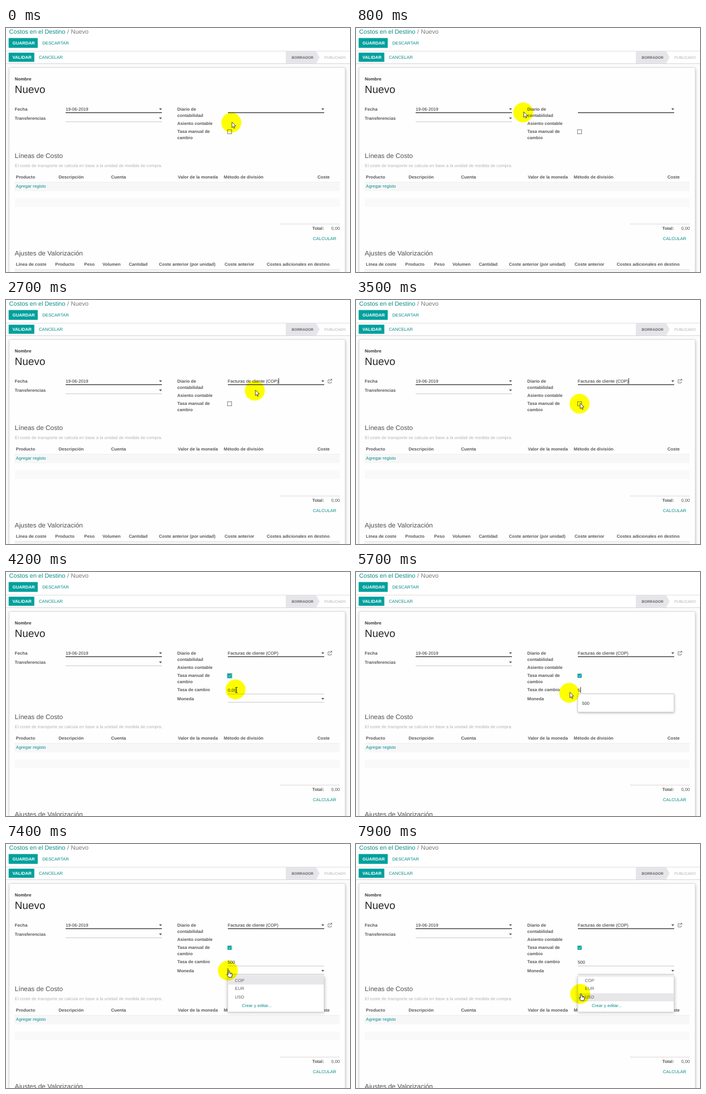
These frames come from a looping animation (600x428 px, 8 s). An HTML page with a canvas:

```html
<!DOCTYPE html>
<html lang="es">
<head>
<meta charset="utf-8">
<title>Costos en el Destino</title>
<style>
html, body { margin: 0; width: 600px; height: 428px; overflow: hidden; background: #fff; }
canvas { display: block; width: 600px; height: 428px; }
</style>
</head>
<body>
<canvas id="stage" width="600" height="428"></canvas>
<script>
const ctx = document.getElementById('stage').getContext('2d');
const LOOP = 8000, STEP = 100;
const FONT = '"Liberation Sans", Arial, sans-serif';
const TEAL = '#00a09d', LINK = '#078c89', INK = '#505050', DARK = '#2c2c2c';

// Pointer path: time, x, y
const path = [
  [0, 393, 166], [400, 205, 152], [500, 205, 152], [1200, 425, 142],
  [1900, 425, 142], [2500, 434, 159], [2700, 434, 159], [3500, 390, 182],
  [3600, 390, 182], [4100, 400, 206], [4500, 402, 206], [4800, 372, 212],
  [6600, 372, 212], [7300, 387, 222], [7500, 387, 222], [7900, 391, 263]
];

const journals = ['Facturas de cliente', 'Facturas de proveedor', 'Operaciones varias',
  'Diario de stock', 'Diferencia de cambio', 'Banco', 'Efectivo'].map(s => s + ' (COP)');
const journalMenu = { y: 153, items: journals, links: ['Buscar más...', 'Crear y editar...'] };
const currencyMenu = { y: 232.5, items: ['COP', 'EUR', 'USD'], links: ['Crear y editar...'] };
const ROW = 14.65;

function pointerAt(t) {
  const i = path.findIndex(p => p[0] >= t);
  if (i <= 0) return { x: path[0][1], y: path[0][2] };
  const [t0, x0, y0] = path[i - 1], [t1, x1, y1] = path[i];
  const u = (t - t0) / (t1 - t0), e = u * u * (3 - 2 * u);
  return { x: x0 + (x1 - x0) * e, y: y0 + (y1 - y0) * e };
}

function text(s, x, y, color = INK, size = 7.65, bold = false) {
  ctx.font = (bold ? 'bold ' : '') + size + 'px ' + FONT;
  ctx.textRendering = 'geometricPrecision';
  ctx.fillStyle = color;
  ctx.fillText(s, x + 0.3, y - 0.2);
}
const label = (s, x, y) => text(s, x, y, '#5a5a5a', 7.65, true);

function rect(x, y, w, h, color) {
  ctx.fillStyle = color;
  ctx.fillRect(x, y, w, h);
}

function poly(points, fill, stroke, width = 1) {
  ctx.beginPath();
  points.forEach(([x, y]) => ctx.lineTo(x, y));
  if (fill) { ctx.closePath(); ctx.fillStyle = fill; ctx.fill(); }
  if (stroke) { ctx.strokeStyle = stroke; ctx.lineWidth = width; ctx.stroke(); }
}

function panel(x, y, w, h, blur, fill = '#fff') {
  ctx.save();
  ctx.shadowColor = 'rgba(0,0,0,.33)';
  ctx.shadowBlur = blur;
  ctx.shadowOffsetY = 1;
  rect(x, y, w, h, fill);
  ctx.restore();
  ctx.strokeStyle = '#d6d6d8';
  ctx.lineWidth = 0.7;
  ctx.strokeRect(x, y, w, h);
}

function field(x, y, required, arrow = true) {
  if (required) rect(x, y - 0.2, 168, 1.4, '#3c3c3c');
  else rect(x, y, 168, 1, '#c9c9c9');
  if (arrow) poly([[x + 163, y - 7], [x + 168, y - 7], [x + 165.5, y - 4]], '#555');
}

const caret = (x, y) => rect(x, y - 5, 1, 10, '#333');

function header() {
  rect(0, 0, 600, 428, '#fbfbfb');
  rect(0, 0, 600, 62, '#fff');
  rect(0, 40, 600, 1, '#dedede');
  rect(0, 62, 600, 1, '#d6d6d6');
  text('Costos en el Destino', 5.3, 10, LINK, 10.6);
  text('/', 106.5, 10, '#777', 10.6);
  text('Nuevo', 113, 10, '#777', 10.6);
  rect(4.6, 17.6, 50.8, 17.2, TEAL);
  text('GUARDAR', 11, 29.5, '#fff', 7.6, true);
  text('DESCARTAR', 63, 29.5, LINK);
  rect(4.6, 43.3, 44.8, 16, TEAL);
  text('VALIDAR', 11, 54, '#fff', 7.6, true);
  text('CANCELAR', 57, 54, LINK);
  poly([[488, 41], [541, 41], [547, 51.5], [541, 62], [488, 62]], '#e6e6ea');
  text('BORRADOR', 498, 54, '#666', 6.45, true);
  text('PUBLICADO', 555, 54, '#aaa', 6.45);
}

function linkIcon() {
  poly([[565, 139.8], [561.8, 139.8], [561.8, 145.6], [567.2, 145.6], [567.2, 143]], null, '#777', 0.9);
  poly([[564, 143], [568, 139]], null, '#777', 1);
  poly([[565.4, 138.4], [568.8, 138.4], [568.8, 141.8]], '#777');
}

function checkbox(on, focus) {
  if (!on) {
    ctx.strokeStyle = '#777';
    ctx.lineWidth = 0.9;
    ctx.strokeRect(386.4, 178.4, 7.2, 7.2);
    return;
  }
  if (focus) rect(385.3, 177.3, 9.4, 9.4, '#8fc9c8');
  rect(386.4, 178.4, 7.2, 7.2, TEAL);
  poly([[388.2, 182.2], [389.5, 183.5], [392, 180.8]], null, '#fff', 1);
}

function form(s) {
  panel(5.5, 69.5, 586, 380, 5, '#fefefe');
  text('Nombre', 15, 92, '#333', 7.65, true);
  text('Nuevo', 15, 114.5, '#222', 18.4);
  label('Fecha', 15, 145);
  text('19-06-2019', 104, 145, DARK);
  field(104, 148, true);
  label('Transferencias', 15, 161);
  field(104, 164, false);
  label('Diario de', 298.5, 145);
  label('contabilidad', 298.5, 156);
  field(387, 148, true);
  label('Asiento contable', 298.5, 170);
  label('Tasa manual de', 298.5, 184.5);
  label('cambio', 298.5, 195);
  checkbox(s.checked, s.focusCheck);
  if (s.journal) {
    text(journals[0], 386.5, 145, DARK);
    linkIcon();
  }
  if (s.checked) {
    label('Tasa de cambio', 298.5, 209.5);
    field(387, 213.5, false, false);
    label('Moneda', 298.5, 225.5);
    field(387, 228, false);
    if (s.selected) rect(386.5, 202, 15.5, 10, '#3390ff');
    text(s.rate, 386.5, 210, s.selected ? '#fff' : DARK);
  }
}

function lines(dy) {
  ctx.save();
  ctx.translate(0, dy);
  text('Líneas de Costo', 15, 228, '#505050', 11.5);
  text('El coste de transporte se calcula en base a la unidad de medida de compra.', 15, 244, '#b4b4b4');
  const cols = [['Producto', 17], ['Descripción', 91.5], ['Cuenta', 183], ['Valor de la moneda', 299.5],
    ['Método de división', 379.5], ['Coste', 543]];
  cols.forEach(([s, x]) => label(s, x, 264.5));
  rect(15, 270, 567, 16, '#f7f7f8');
  rect(15, 270, 567, 1, '#eeeeee');
  rect(15, 299, 567, 15, '#f9f9fa');
  text('Agregar registo', 17, 280, LINK);
  rect(478, 343.5, 104, 0.8, '#ccc');
  label('Total:', 534, 354.5);
  text('0,00', 567, 354.5);
  text('CALCULAR', 535, 372.5, LINK);
  text('Ajustes de Valorización', 15, 399, '#505050', 11.5);
  const adjust = [['Línea de coste', 17], ['Producto', 85.5], ['Peso', 136], ['Volumen', 168], ['Cantidad', 214],
    ['Coste anterior (por unidad)', 266.5], ['Coste anterior', 381], ['Costes adicionales en destino', 454.5]];
  adjust.forEach(([s, x]) => label(s, x, 417.5));
  rect(15, 423, 567, 16, '#f3f3f3');
  rect(15, 423, 567, 1, '#e6e6e6');
  ctx.restore();
}

function menu(m, active) {
  const rows = m.items.length + m.links.length;
  panel(387, m.y - 0.7, 167.5, rows * ROW + 4, 6);
  rect(387.5, m.y + active * ROW, 166.5, 14, '#e7e7ea');
  m.items.forEach((s, i) => text(s, 399, m.y + 9.3 + i * ROW, '#606060'));
  m.links.forEach((s, i) => text(s, 411, m.y + 9.3 + (m.items.length + i) * ROW, LINK));
}

function arrow(x, y) {
  poly([[0, 0], [0, 9.6], [2.2, 7.6], [3.7, 11], [5.2, 10.3], [3.8, 7], [6.8, 6.8]]
    .map(([a, b]) => [x + a, y + b]), '#fff', '#222', 0.8);
}

function hand(x, y) {
  ctx.beginPath();
  ctx.moveTo(x - 1, y + 0.8);
  ctx.quadraticCurveTo(x, y - 0.8, x + 1, y + 0.8);
  ctx.lineTo(x + 1, y + 4.5);
  ctx.lineTo(x + 5.2, y + 5.4);
  ctx.quadraticCurveTo(x + 6.4, y + 6, x + 6, y + 8.5);
  ctx.lineTo(x + 5, y + 12.5);
  ctx.lineTo(x, y + 12.5);
  ctx.lineTo(x - 3.6, y + 7.6);
  ctx.quadraticCurveTo(x - 3.2, y + 6, x - 1, y + 8);
  ctx.closePath();
  ctx.fillStyle = '#fff';
  ctx.fill();
  ctx.strokeStyle = '#222';
  ctx.lineWidth = 0.9;
  ctx.stroke();
  [2.4, 4].forEach(d => poly([[x + d, y + 5], [x + d, y + 7.2]], null, '#222', 0.7));
}

function beam(x, y) {
  rect(x - 0.5, y - 4.5, 1, 9, '#222');
  rect(x - 2, y - 5, 4, 0.9, '#222');
  rect(x - 2, y + 4.2, 4, 0.9, '#222');
}

function pointer(p, s) {
  ctx.save();
  ctx.globalCompositeOperation = 'multiply';
  ctx.beginPath();
  ctx.arc(p.x, p.y, 17.4, 0, Math.PI * 2);
  ctx.fillStyle = '#ffff00';
  ctx.fill();
  ctx.restore();
  const { x, y } = p;
  const left = x > 104 && x < 272, right = x > 386.5 && x < 555;
  const overField = (left || right) && y > 135 && y < 149 || left && y > 151 && y < 165;
  const overMenu = right && (s.journalOpen && y > 135 || s.currencyOpen && y > 215);
  if (overField || overMenu || s.checked && right && y > 216) hand(x + 1.5, y - 0.6);
  else if (s.checked && right && y > 199) beam(x + 1.5, y + 1);
  else arrow(x + 1, y - 1);
}

function stateAt(t) {
  const between = (a, b) => t >= a && t < b;
  return {
    journalOpen: between(1900, 2700),
    journal: t >= 2700,
    checked: t >= 3700,
    focusCheck: between(3700, 4600),
    selected: between(4700, 5700),
    rate: t < 5700 ? '0,00' : '500'.slice(0, t < 5800 ? 1 : t < 6000 ? 2 : 3),
    hint: between(5700, 6200),
    currencyOpen: t >= 7300,
    journalCaret: between(1700, 2700),
    textCaret: between(2700, 3700),
    currencyCaret: between(7200, 7600)
  };
}

function draw(t) {
  const s = stateAt(t), p = pointerAt(t);
  header();
  form(s);
  lines(s.checked ? 30 : 0);
  if (s.journalCaret) caret(386.5, 142);
  if (s.textCaret) caret(475.2, 142);
  if (s.currencyCaret) caret(386.5, 223);
  if (s.hint) {
    caret(387 + s.rate.length * 4.25, 207);
    panel(387, 214, 167.5, 31.5, 4);
    text('500', 394, 233, '#333');
  }
  if (s.journalOpen) menu(journalMenu, 0);
  if (s.currencyOpen) menu(currencyMenu, Math.max(0, Math.min(2, Math.floor((p.y - 232) / ROW))));
  pointer(p, s);
}

const start = performance.now();
function tick() {
  const t = Math.max(0, performance.now() - start) % LOOP;
  draw(Math.floor(t / STEP) * STEP);
  requestAnimationFrame(tick);
}
tick();
</script>
</body>
</html>
```
